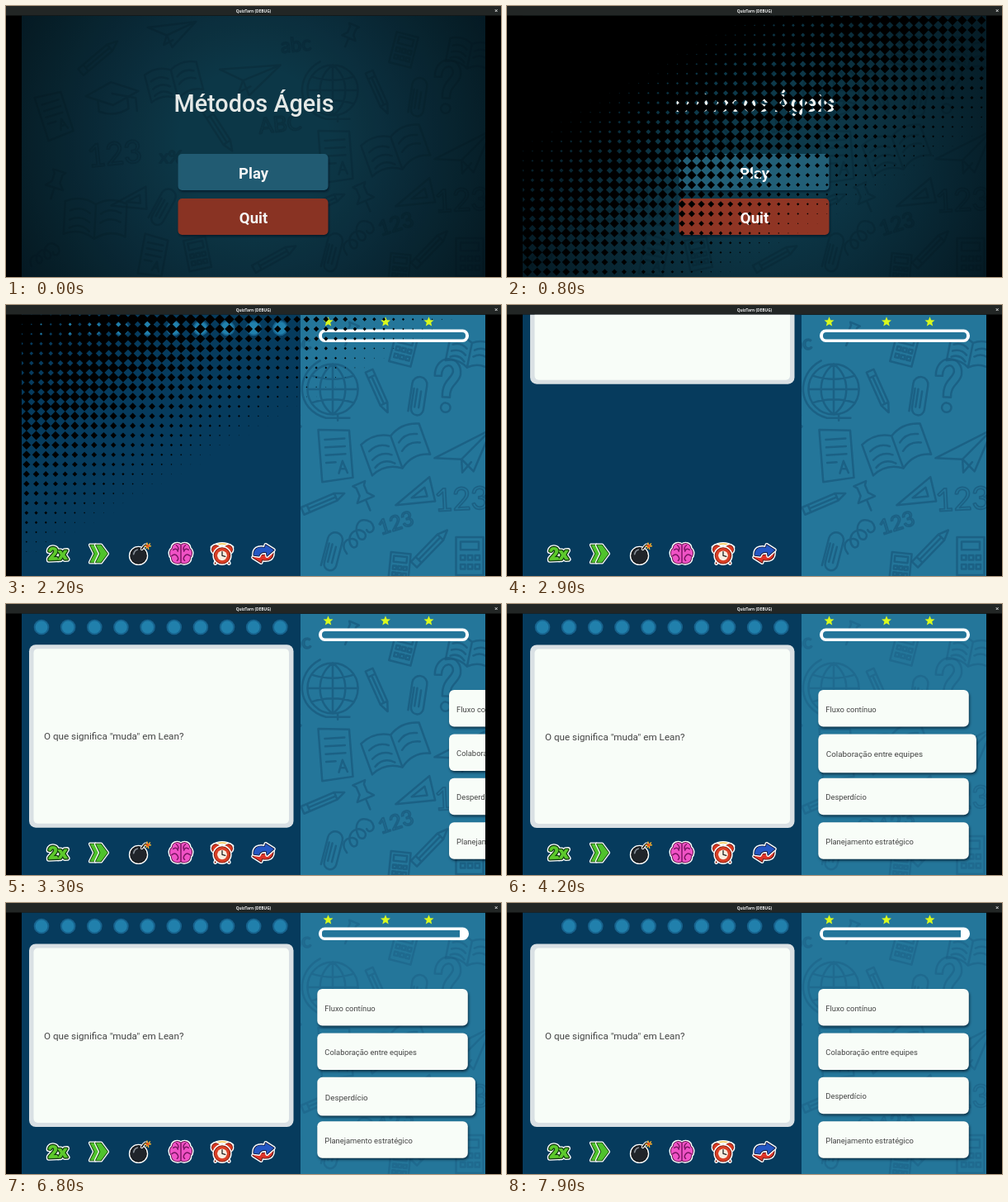
These frames come from a looping animation (600 by 328 pixels, 8 s). An HTML page with a canvas:

```html
<!DOCTYPE html>
<html lang="pt">
<head>
<meta charset="utf-8">
<style>
html, body { margin: 0; width: 600px; height: 328px; overflow: hidden; background: #000; }
canvas { display: block; }
</style>
</head>
<body>
<canvas id="stage" width="600" height="328"></canvas>
<script>
const c = document.getElementById('stage').getContext('2d');
const LOOP = 8000, TAU = Math.PI * 2;
const X0 = 19, Y0 = 11.5, W = 562, H = 316.5;
const PAPER = '#f8fdf8';

const ramp = (t, start, length) => Math.min(1, Math.max(0, (t - start) / length));
const easeOut = p => 1 - (1 - p) ** 2;

function at(x, y, draw, turn = 0, size = 1) {
  c.save();
  c.translate(x, y);
  c.rotate(turn);
  c.scale(size, size);
  draw();
  c.restore();
}
function rect(x, y, w, h, color) {
  c.fillStyle = color;
  c.fillRect(x, y, w, h);
}
function box(x, y, w, h, r, color) {
  c.beginPath();
  c.roundRect(x, y, w, h, r);
  c.fillStyle = color;
  c.fill();
}
function disc(x, y, r, color) {
  c.beginPath();
  c.arc(x, y, r, 0, TAU);
  c.fillStyle = color;
  c.fill();
}
function text(s, x, y, font, color, align = 'left') {
  c.font = font + ' Roboto, sans-serif';
  c.textAlign = align;
  c.fillStyle = color;
  c.fillText(s, x, y);
}
function line(path, color, width) {
  c.strokeStyle = color;
  c.lineWidth = width;
  c.stroke(new Path2D(path));
}
function sticker(path, color, edge = '#111') {
  const p = new Path2D(path);
  for (const [style, width] of [['#fff', 5], [edge, 2]]) {
    c.strokeStyle = style;
    c.lineWidth = width;
    c.stroke(p);
  }
  c.fillStyle = color;
  c.fill(p);
}
function shadowed(draw) {
  c.save();
  c.shadowColor = 'rgba(0,15,30,.65)';
  c.shadowBlur = 3;
  c.shadowOffsetX = 1;
  c.shadowOffsetY = 2;
  draw();
  c.restore();
}

// School doodles, each drawn around its own centre
const shapes = {
  globe: 'M-30 0A30 30 0 1 1 30 0A30 30 0 1 1-30 0M-30 0H30M0-30V30M0-30C-20-15-20 15 0 30C20 15 20-15 0-30M-25-16Q0-8 25-16M-25 16Q0 8 25 16M-15-34C-45-18-44 24-8 34H20M6 31V37',
  book: 'M0-18Q-16-28-34-20V16Q-16 8 0 20Q16 8 34 16V-20Q16-28 0-18V20M-28-10Q-16-16-6-8M-28 0Q-16-6-6 2M-28 9Q-16 2-6 12M28-10Q16-16 6-8M28 0Q16-6 6 2',
  page: 'M-18-30L18-27L19 28L-17 31ZM-11-18H12M-11-9H12M-11 0H12M-11 9H0M3 22L8 8L13 22M5 17H11',
  clip: 'M-7-10V14A7 7 0 0 0 8 14V-16A9 9 0 0 0-10-16V18M2-8V12M-3-10V12',
  quest: 'M-13-12C-14-36 16-36 14-14C12-4 3-3 4 10H-4C-5-8 5-10 6-17C6-26-6-26-6-12ZM0 16A5 5 0 1 1 0 26A5 5 0 1 1 0 16',
  pin: 'M-8-16H8L5-12V-2L11 5H-11L-5-2V-12ZM0 5V19',
  pencil: 'M-28-5H18L30 0L18 5H-28ZM-20-5V5M18-5V5M-20 0H18',
  plane: 'M-36-4L36-20L4 22L-6 5ZM36-20L-6 5L-9 20L4 11',
  ruler: 'M-24 13L20-17L24 13ZM-4 6L13-5L15 6Z',
  calc: 'M-15-21H15V21H-15ZM-10-16H10V-7H-10ZM-10-1H-5V4H-10ZM-2-1H3V4H-2ZM6-1H11V4H6ZM-10 9H-5V14H-10ZM-2 9H3V14H-2ZM6 9H11V14H6Z',
  cap: 'M-32-4L0-18L32-4L0 10ZM-18 3V16Q0 25 18 16V3M0-4L28 4V20',
  coil: 'M-14 20C-26 4 0 0-4 12C-10 20-18-2-2-4C10-2 4 10-2 4C-8-8-2-18 10-12C18-4 8 2 6-4'
};
const doodles = [
  ['globe', 396, 102, 0, 1.02], ['clip', 500, 112, .15, 1], ['quest', 534, 100, .05, 1.15],
  ['pencil', 451, 104, 1.15, .95], ['calc', 482, 53, .25, .9], ['page', 399, 181, -.06, 1.04],
  ['book', 473, 177, -.35, 1.1], ['plane', 557, 180, -.25, 1.05], ['pin', 434, 231, -.4, 1],
  ['pencil', 384, 239, -.4, .95], ['ruler', 495, 227, -.1, 1], ['coil', 430, 277, 0, 1.2],
  ['clip', 396, 300, .25, 1], ['calc', 562, 304, 0, 1.1], ['pencil', 514, 294, -.8, 1],
  ['book', 562, 60, .2, .8], ['calc', 477, 317, .1, .8], ['pin', 417, 35, .4, .8],
  ['cap', 129, 110, -.1, 1], ['pencil', 112, 62, -.7, 1], ['book', 204, 94, -.25, .95],
  ['plane', 294, 86, .15, 1], ['page', 58, 132, -.3, .9], ['ruler', 150, 232, .1, .9],
  ['book', 108, 260, .05, 1.1], ['clip', 190, 245, .5, 1], ['pin', 60, 215, .3, 1],
  ['pencil', 258, 150, 1, 1], ['calc', 232, 300, -.2, .9], ['pencil', 325, 305, -.5, 1],
  ['page', 178, 302, .2, .8], ['coil', 50, 300, .3, 1], ['plane', 200, 32, .1, .8]
];
const scribbles = [
  ['123', 475, 272, -.3, 25], ['123', 553, 248, -.05, 38], ['123', 133, 192, -.1, 38],
  ['ABC', 333, 152, -.1, 26], ['x%', 200, 190, 0, 22], ['abc', 352, 55, -.1, 24]
];

function backdrop(base, ink, alpha) {
  rect(X0, Y0, W, H, base);
  c.save();
  c.globalAlpha = alpha;
  for (const [name, x, y, turn, size] of doodles)
    at(x, y, () => line(shapes[name], ink, 2.5 / size), turn, size);
  c.textAlign = 'center';
  c.strokeStyle = ink;
  c.lineWidth = 1.8;
  for (const [s, x, y, turn, size] of scribbles) at(x, y, () => {
    c.font = size + 'px Lato, sans-serif';
    c.strokeText(s, 0, 0);
  }, turn);
  c.restore();
}

function menu(t) {
  backdrop('#0d394a', '#082c3a', .5);
  const shade = c.createRadialGradient(300, 165, 90, 300, 165, 340);
  shade.addColorStop(0, 'rgba(0,8,13,0)');
  shade.addColorStop(1, 'rgba(0,8,13,.68)');
  rect(X0, Y0, W, H, shade);
  text('Métodos Ágeis', 300.5, 127.5, '500 28.8px', '#eef2f0', 'center');
  for (const [label, y, color] of [['Play', 179, '#225f77'], ['Quit', 233, '#8f3524']]) {
    shadowed(() => box(208.5, y, 182, 44, 5, color));
    text(label, 300, y + 30, 'bold 18.5px', '#fff', 'center');
  }
  rect(X0, Y0, W, H, `rgba(0,0,0,${.04 * (1 - ramp(t, 0, 300))})`);
}

function star(x, y) {
  c.beginPath();
  for (let i = 0; i < 10; i++) {
    const a = i * TAU / 10 - TAU / 4, r = i % 2 ? 2.8 : 6.3;
    c.lineTo(x + r * Math.cos(a), y + r * Math.sin(a));
  }
  c.closePath();
  c.fillStyle = '#d9fa1e';
  c.fill();
}

function icons() {
  at(62.5, 301.5, () => {
    c.font = '900 24px Lato, sans-serif';
    c.textAlign = 'center';
    for (const [color, width] of [['#fff', 7], ['#123d10', 4], ['#5ecb2c', 1]]) {
      c.strokeStyle = color;
      c.lineWidth = width;
      c.strokeText('2x', 0, 8);
    }
    c.fillStyle = '#5ecb2c';
    c.fillText('2x', 0, 8);
  }, -.04, .86);
  at(112.5, 301, () => {
    for (const x of [-4, 4])
      sticker(`M${x - 8}-12L${x - 1}-12L${x + 8} 0L${x - 1} 12L${x - 8} 12L${x - 2} 0Z`, '#4fc22c', '#15440f');
  }, 0, .87);
  at(161, 302.5, () => {
    sticker('M-11 1A10.5 10.5 0 1 1 10 1A10.5 10.5 0 1 1-11 1', '#20242a');
    line('M4-8L7-12Q9-15 12-12', '#fff', 4);
    line('M4-8L7-12Q9-15 12-12', '#2a2421', 2);
    line('M-7-1Q-6-6-2-7', '#8a929a', 1.8);
    line('M11-16L13-8M8-12H16M10-9L15-15', '#ffb52a', 1.6);
    disc(12, -12, 2, '#e8501f');
  }, 0, .9);
  at(212, 301, () => {
    sticker('M0-11C-5-15-11-12-11-7C-16-3-14 3-12 5C-12 12-4 14 0 11C4 14 12 12 12 5C14 3 16-3 11-7C11-12 5-15 0-11Z', '#f052c5', '#5c1148');
    line('M0-11V11M-10-5Q-5-8-4-3M-12 3Q-8-1-5 3T-5 9M-6-11Q-2-8-4-4M10-5Q5-8 4-3M12 3Q8-1 5 3T5 9M6-11Q2-8 4-4', '#7c1664', 1.6);
  }, 0, .93);
  at(262, 301.5, () => {
    line('M-13-9Q0-17 13-9', '#fff', 5);
    line('M-13-10Q0-17 13-10', '#f3c44c', 1.5);
    sticker('M-7 8L-9 12M7 8L9 12M-12-3A5 5 0 0 1-4-9ZM12-3A5 5 0 0 0 4-9Z', '#d93820', '#7c1b10');
    sticker('M-10 2A10 10 0 1 1 10 2A10 10 0 1 1-10 2', '#d93f25', '#7c1b10');
    disc(0, 2, 6.3, '#f8eee0');
    line('M0 2V-3M0 2L4 3', '#222', 1.4);
  }, 0, .93);
  at(312, 301, () => {
    sticker('M13-2Q13 11-2 8L-3 12L-14 5L-5-3L-4 2Q4 3 6-3Z', '#dc3327', '#461010');
    sticker('M-13 2Q-13-11 2-8L3-12L14-5L5 3L4-2Q-4-3-6 3Z', '#2457c4', '#111b3c');
  }, 0, .9);
}

const answers = ['Fluxo contínuo', 'Colaboração entre equipes', 'Desperdício', 'Planejamento estratégico'];
const hovers = { 1: [4000, 4700], 2: [4900, 7000] };

function game(t) {
  backdrop('#24769a', '#1a5c80', .8 - .35 * ramp(t, 3400, 500));
  rect(X0, Y0, 338, H, '#063b5d');

  for (let i = 0; i < 10; i++) {
    const size = i ? 1 : 1 - ramp(t, 7400, 400);
    disc(43 + i * 32.15, 28, 9.3 * size, '#17638e');
    disc(43 + i * 32.15, 28, 7.4 * size, '#2180ac');
  }
  icons();

  for (const x of [390.5, 460, 512.5]) star(x, 20.5);
  box(379, 29.5, 182, 15.5, 7.5, '#fff');
  const left = 174 - 7 * ramp(t, 4300, 1300);
  box(383, 33, left, 8.5, left < 174 ? [3, 0, 0, 3] : 4, '#24769a');

  const drop = -270 * (1 - easeOut(ramp(t, 2800, 520)));
  at(0, drop, () => {
    box(28, 49.5, 320.5, 221.5, 8, '#d9e0e4');
    box(33.5, 54.5, 309.5, 211.5, 5, PAPER);
    text('O que significa "muda" em Lean?', 46, 164.5, '11.7px', '#444');
  });

  const x = 377.3 + 233 * (1 - easeOut(ramp(t, 3215, 500)));
  answers.forEach((label, i) => {
    const [on, off] = hovers[i] || [LOOP, LOOP];
    const grow = ramp(t, on, 100) - ramp(t, off, 100);
    at(x, 104 + i * 53.4, () => {
      shadowed(() => box(0, 0, 182.5, 44.5, 6, PAPER));
      text(label, 9, 26.5, '9.4px', '#444');
    }, 0, 1 + .05 * grow);
  });
}

// Black diamonds that grow along the diagonal
function wipe(level) {
  const cell = W / 48;
  c.fillStyle = '#000';
  c.beginPath();
  for (let i = 0; i < 48; i++) for (let j = 0; j < 28; j++) {
    const d = Math.min(1.03, level * 4 - (i + .5) / 48 - (j + .5) / 27);
    if (d <= 0) continue;
    const r = d * cell, x = X0 + (i + .5) * cell, y = Y0 + (j + .5) * cell;
    c.moveTo(x, y - r);
    c.lineTo(x + r, y);
    c.lineTo(x, y + r);
    c.lineTo(x - r, y);
    c.closePath();
  }
  c.fill();
}

function frame(now) {
  const t = now % LOOP;
  rect(0, 0, 600, 328, '#000');
  c.save();
  c.lineJoin = c.lineCap = 'round';
  c.beginPath();
  c.rect(X0, Y0, W, H);
  c.clip();
  (t < 1440 ? menu : game)(t);
  wipe(ramp(t, 436, 1000) - ramp(t, 1444, 1000));
  c.restore();
  rect(0, 0, 600, 11.5, '#222625');
  c.font = 'bold 4.8px "Noto Sans", sans-serif';
  c.textAlign = 'center';
  c.fillStyle = '#f2f2f2';
  c.fillText('QuizTarn (DEBUG)', 300, 7.5);
  line('M592.8 4.2L595.6 7M595.6 4.2L592.8 7', '#f2f2f2', .9);
  requestAnimationFrame(frame);
}
requestAnimationFrame(frame);
</script>
</body>
</html>
```
